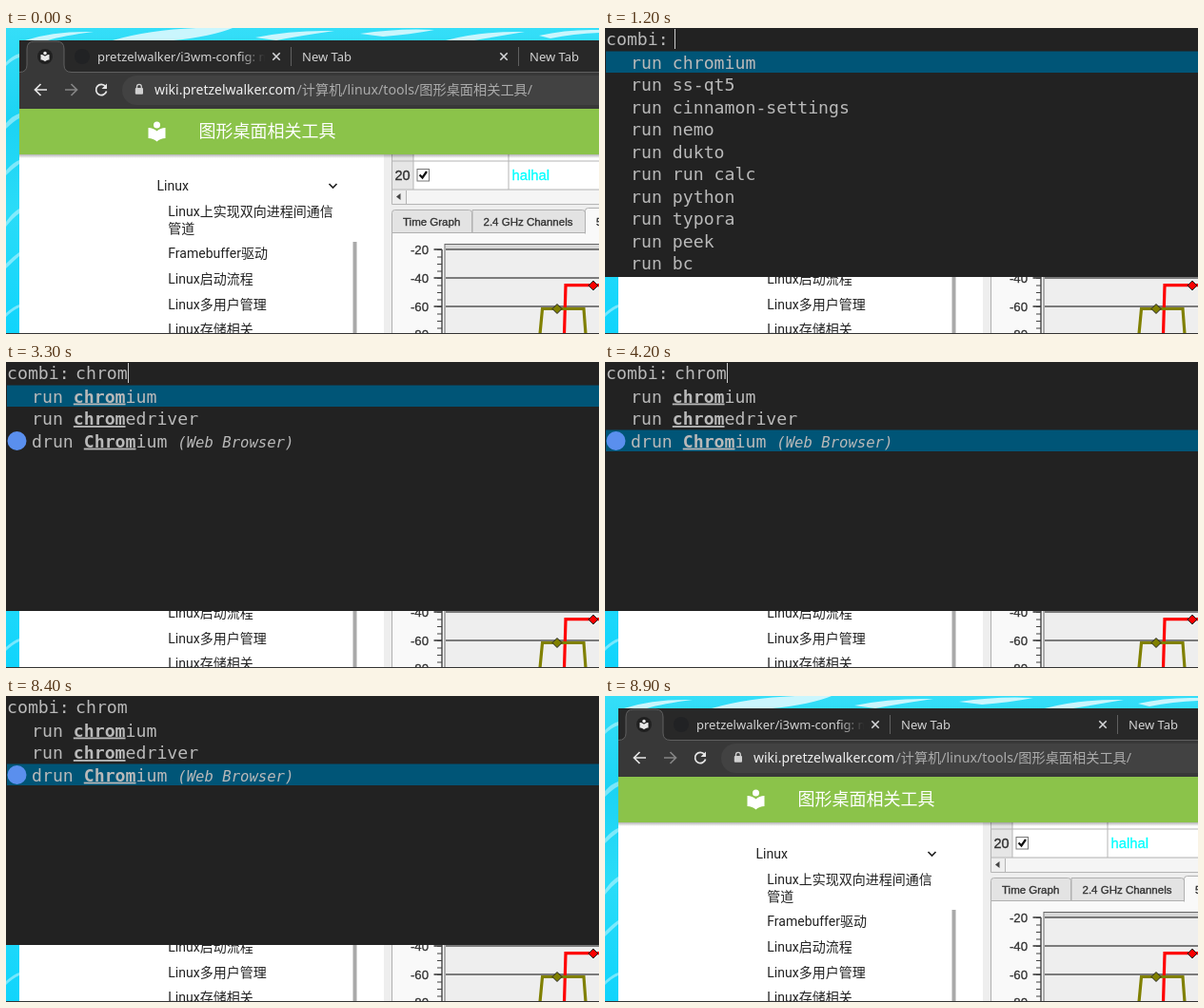
Animation of 623x322 px, one loop 9100 ms. Source, as an HTML page:

```html
<!DOCTYPE html>
<html lang="zh">
<head>
<meta charset="utf-8">
<title>Launcher demo</title>
<style>
html, body { margin: 0; width: 100%; height: 100%; overflow: hidden; background: #18d6f8; }
svg { display: block; }
text { white-space: pre; }
.ui { font-family: "Noto Sans", "Noto Sans CJK SC", sans-serif; }
.page { font-family: Roboto, "Noto Sans CJK SC", sans-serif; }
.app { font-family: "Liberation Sans", Arial, sans-serif; }
.mono { font: 18.2px "DejaVu Sans Mono", monospace; fill: #b9b9b9; }
.hit { font-weight: bold; text-decoration: underline; }
.note { font-size: 15.6px; font-style: italic; }
#menu, #bar, #strip, #caret { animation: 9100ms step-end infinite; }
#menu { animation-name: fade; }
#bar { animation-name: pick; }
#strip { animation-name: query; }
#caret { animation-name: type, blink; }
@keyframes fade {
  0% { opacity: 0; }
  12.087% { opacity: .36; }
  13.186% { opacity: 1; }
  94.505% { opacity: .7; }
  95.604% { opacity: .4; }
  96.703% { opacity: .1; }
  97.802%, 100% { opacity: 0; }
}
@keyframes pick {
  0% { transform: translateY(0); }
  45.054% { transform: translateY(23.5px); }
  46.153%, 100% { transform: translateY(47px); }
}
@keyframes query {
  0% { transform: translateY(0); }
  29.67% { transform: translateY(-262px); }
  31.868% { transform: translateY(-524px); }
  32.967% { transform: translateY(-786px); }
  34.065% { transform: translateY(-1048px); }
  36.263%, 100% { transform: translateY(-1310px); }
}
@keyframes type {
  0% { transform: translateX(0); }
  29.67% { transform: translateX(11px); }
  31.868% { transform: translateX(22px); }
  32.967% { transform: translateX(33px); }
  34.065% { transform: translateX(44px); }
  36.263%, 100% { transform: translateX(55px); }
}
@keyframes blink {
  0% { opacity: 1; }
  25.274% { opacity: 0; }
  29.67% { opacity: 1; }
  65.934% { opacity: 0; }
  79.12% { opacity: 1; }
  92.307%, 100% { opacity: 0; }
}
</style>
</head>
<body>
<svg width="623" height="322" viewBox="0 0 623 322">
  <defs>
    <linearGradient id="water" x2="0" y2="1">
      <stop offset="0" stop-color="#35def8"/>
      <stop offset=".3" stop-color="#1bd3f4"/>
      <stop offset=".6" stop-color="#2adcf8"/>
      <stop offset="1" stop-color="#10d4fc"/>
    </linearGradient>
    <linearGradient id="shade" x2="0" y2="1">
      <stop offset="0" stop-opacity=".3"/>
      <stop offset="1" stop-opacity="0"/>
    </linearGradient>
    <linearGradient id="tail">
      <stop offset="0" stop-color="#282828" stop-opacity="0"/>
      <stop offset="1" stop-color="#282828"/>
    </linearGradient>
    <path id="reader" d="M12 11.55C9.64 9.35 6.48 8 3 8v11c3.48 0 6.64 1.35 9 3.55 2.36-2.19 5.52-3.55 9-3.55V8c-3.48 0-6.64 1.35-9 3.55z"/>
    <path id="cross" d="M-3.7-3.7L3.7 3.7M3.7-3.7L-3.7 3.7" stroke="#d5d6d8" stroke-width="1.6"/>
    <path id="gem" d="M0-5L5 0 0 5-5 0z" stroke="#222"/>
  </defs>

  <!-- wallpaper -->
  <rect width="623" height="322" fill="url(#water)"/>
  <g fill="#f0fdff">
    <path d="M20 13Q50 3 92 4Q60 8 44 13zM112 13Q150 2 200 0H238Q216 9 176 13zM262 10Q300 2 345 3Q310 8 284 13zM372 6Q412 0 450 2Q424 7 396 9zM462 13Q500 3 545 4Q515 9 492 13zM560 8Q590 1 623 2V5Q596 6 572 11z" opacity=".8"/>
    <path d="M0 36Q7 29 14 27V31Q7 33 0 40zM0 100Q7 92 14 90V95Q8 98 0 106zM0 150Q8 141 14 139V143Q7 148 0 155zM0 204Q7 194 14 190V195Q8 199 0 209zM0 248Q8 240 14 236V240Q7 246 0 253zM0 300Q8 293 14 291V294Q7 297 0 304z" opacity=".45"/>
  </g>

  <!-- browser frame -->
  <rect x="14" y="13" width="609" height="72" fill="#282828"/>
  <path d="M14 47H623V85H14z" fill="#383838"/>
  <path d="M14 46.5Q22 46.5 22 39V22Q22 14 30 14H53Q61 14 61 22V39Q61 46.5 69 46.5H623V50H14z" fill="#383838"/>
  <path d="M14 46.5Q22 46.5 22 39V22Q22 14 30 14H53Q61 14 61 22V39Q61 46.5 69 46.5H623" fill="none" stroke="#606060"/>
  <path d="M299.5 20V40M538.5 20V40" stroke="#606060"/>
  <circle cx="41" cy="30" r="8" fill="#202020"/>
  <g fill="#e8e8e8" transform="translate(35 24) scale(.5)"><use href="#reader"/><circle cx="12" cy="5" r="3.5"/></g>
  <circle cx="80" cy="30" r="8" fill="#212224"/>
  <g class="ui" font-size="13" fill="#d2d2d2">
    <svg x="90" y="14" width="182" height="30"><text x="6" y="21">pretzelwalker/i3wm-config: my</text></svg>
    <rect x="246" y="18" width="26" height="25" fill="url(#tail)"/>
    <text x="311" y="35">New Tab</text>
    <text x="550" y="35">New Tab</text>
  </g>
  <use href="#cross" x="284" y="30"/>
  <use href="#cross" x="523" y="30"/>

  <rect x="122" y="50" width="530" height="31" rx="15.5" fill="#424242"/>
  <g fill="none" stroke="#e6e6e6" stroke-width="1.7">
    <path d="M43 65H31M36.5 59L30.5 65 36.5 71"/>
    <path d="M62 65H74M68.5 59L74.5 65 68.5 71" stroke="#858585"/>
    <path d="M104.6 61.5A5.6 5.6 0 1 0 105.6 66.5"/>
    <path d="M137.5 63V61.8A2.4 2.4 0 0 1 142.3 61.8V63" stroke="#d0d0d0" stroke-width="1.3"/>
  </g>
  <path d="M106 58.5V64H100.5z" fill="#e6e6e6"/>
  <rect x="135.8" y="63" width="8.2" height="6.8" rx="1" fill="#d0d0d0"/>
  <text class="ui" font-size="14" x="156" y="70" fill="#f0f0f0">wiki.pretzelwalker.com<tspan font-size="14.2" x="305.5" fill="#ababab">/计算机/linux/tools/图形桌面相关工具/</tspan></text>

  <!-- wiki page -->
  <rect x="14" y="133" width="609" height="189" fill="#fff"/>
  <g class="page" font-size="14" fill="#222">
    <text x="158.5" y="171">Linux</text>
    <text x="170.3" y="197.5">Linux上实现双向进程间通信</text>
    <text x="170.3" y="215.5">管道</text>
    <text x="170.3" y="242">Framebuffer驱动</text>
    <text x="170.3" y="269">Linux启动流程</text>
    <text x="170.3" y="295.5">Linux多用户管理</text>
    <text x="170.3" y="322">Linux存储相关</text>
  </g>
  <path d="M339.5 164L343.5 168 347.5 164" fill="none" stroke="#222" stroke-width="1.7"/>
  <rect x="364.5" y="225" width="4" height="97" fill="#a9a9a9"/>

  <!-- network table -->
  <rect x="397" y="133" width="226" height="189" fill="#eee"/>
  <rect x="428" y="133" width="195" height="37" fill="#fff"/>
  <rect x="406" y="133" width="22" height="37" fill="#e6e6e6"/>
  <path d="M405.5 133V185.5H623M428 133V170M528 133V170M406 140H623M406 170H623" fill="none" stroke="#b5b5b5"/>
  <rect x="420" y="171" width="203" height="14" fill="#f5f5f5"/>
  <path d="M420.5 171V185" stroke="#b5b5b5"/>
  <path d="M414.5 174V181L410 177.5z" fill="#444"/>
  <rect x="432" y="148.500" width="12.500" height="12.500" fill="#fff" stroke="#777"/>
  <path d="M434.500 154.500L437.500 157.500 442 151" fill="none" stroke="#111" stroke-width="2.200"/>
  <g class="app" fill="#333">
    <text x="408.5" y="160" font-size="14.5" stroke="#333" stroke-width=".4">20</text>
    <text x="531.5" y="160" font-size="14.8" fill="#0ff" stroke="#0ff" stroke-width=".3">halhal</text>
  </g>

  <!-- chart tabs -->
  <rect x="405.5" y="215.5" width="230" height="120" fill="#f9f9f9" stroke="#b0b0b0"/>
  <path d="M405.5 215.5V194.5Q405.5 191.5 408.5 191.5H486.5Q489.5 191.5 489.5 194.5V215.5zM490 215.5V191.5H605.5Q608.5 191.5 608.5 194.5V215.5z" fill="#e3e3e3" stroke="#b0b0b0"/>
  <path d="M608.5 216.5V192.5Q608.5 189.5 611.5 189.5H630V216.5" fill="#f9f9f9" stroke="#b0b0b0"/>
  <g class="app" font-size="11.5" fill="#333" stroke="#333" stroke-width=".35">
    <text x="417" y="208">Time Graph</text>
    <text x="501.5" y="208">2.4 GHz Channels</text>
    <text x="620" y="208">5 GHz Channels</text>
  </g>

  <!-- signal chart -->
  <rect x="461" y="227.5" width="170" height="100" fill="#eee" stroke="#666"/>
  <rect x="462" y="228" width="161" height="5" fill="#d8d8d8"/>
  <path d="M462 233H623M462 263H623M462 293H623" stroke="#555" stroke-width="1.5"/>
  <path d="M458 233V322M449.5 233H458M449.5 263H458M449.5 293H458" stroke="#333" stroke-width="1.3"/>
  <path d="M455.500 233V322" stroke="#444" stroke-width="5" stroke-dasharray="1 6.500"/>
  <g class="app" font-size="13.2" fill="#333" stroke="#333" stroke-width=".3" text-anchor="end">
    <text x="444" y="238">-20</text>
    <text x="444" y="268">-40</text>
    <text x="444" y="298">-60</text>
    <text x="444" y="327">-80</text>
  </g>
  <g fill="none" stroke-width="3.2">
    <path d="M586.5 322L588 270.700H623" stroke="#f00"/>
    <path d="M561 322L563.500 295.500H607L609 322" stroke="#808000"/>
  </g>
  <use href="#gem" x="617" y="271" fill="#f00"/>
  <use href="#gem" x="579" y="295.500" fill="#808000"/>

  <!-- page header -->
  <rect x="14" y="133" width="609" height="4" fill="url(#shade)"/>
  <rect x="14" y="85" width="609" height="48" fill="#8bc34a"/>
  <g fill="#fff" transform="translate(146.500 97)"><use href="#reader"/><circle cx="12" cy="5" r="3.500"/></g>
  <text class="page" font-size="18" x="202.500" y="115.300" fill="#fff">图形桌面相关工具</text>
  <rect y="321" width="623" height="1" fill="#333"/>

  <!-- launcher -->
  <svg id="menu" width="623" height="262">
    <rect width="623" height="262" fill="#222"/>
    <rect id="bar" x="1" y="24.5" width="622" height="22.5" fill="#057"/>
    <g id="strip" class="mono"></g>
    <rect id="caret" x="73" y="1" width="1" height="21" fill="#ccc"/>
  </svg>
</svg>
<script>
const pages = [
  ['', 'chromium ss-qt5 cinnamon-settings nemo dukto run_calc python typora peek bc'],
  ['c', 'chromium cinnamon-settings run_calc bc c++ cal cat cc cd chcon'],
  ['ch', 'chromium chacl chage chattr chcon chfn chgrp chmod chown chroot'],
  ['chr', 'chromium chromedriver chrt chroot Chromium'],
  ['chro', 'chromium chromedriver chroot Chromium'],
  ['chrom', 'chromium chromedriver Chromium']
];

function mark(name, query) {
  const at = name.toLowerCase().indexOf(query);
  if (!query || at < 0) return name;
  const end = at + query.length;
  return `${name.slice(0, at)}<tspan class="hit">${name.slice(at, end)}</tspan>${name.slice(end)}`;
}

function row(word, i, query) {
  const name = word.replace('_', ' ');
  const y = 42.5 + 23.55 * i;
  const label = mark(name, query);
  if (name !== 'Chromium') return `<text x="27" y="${y}">run ${label}</text>`;
  return `<circle cx="11.5" cy="${y - 6.6}" r="10" fill="#5a8fee"/>` +
    `<text x="27" y="${y}">drun ${label} <tspan class="note">(Web Browser)</tspan></text>`;
}

document.getElementById('strip').innerHTML = pages.map(([query, names], i) =>
  `<g transform="translate(0 ${262 * i})"><text x="1" y="17.5">combi:</text>` +
  `<text x="73" y="17.5">${query}</text>` +
  names.split(' ').map((word, n) => row(word, n, query)).join('') + '</g>').join('');
</script>
</body>
</html>
```
